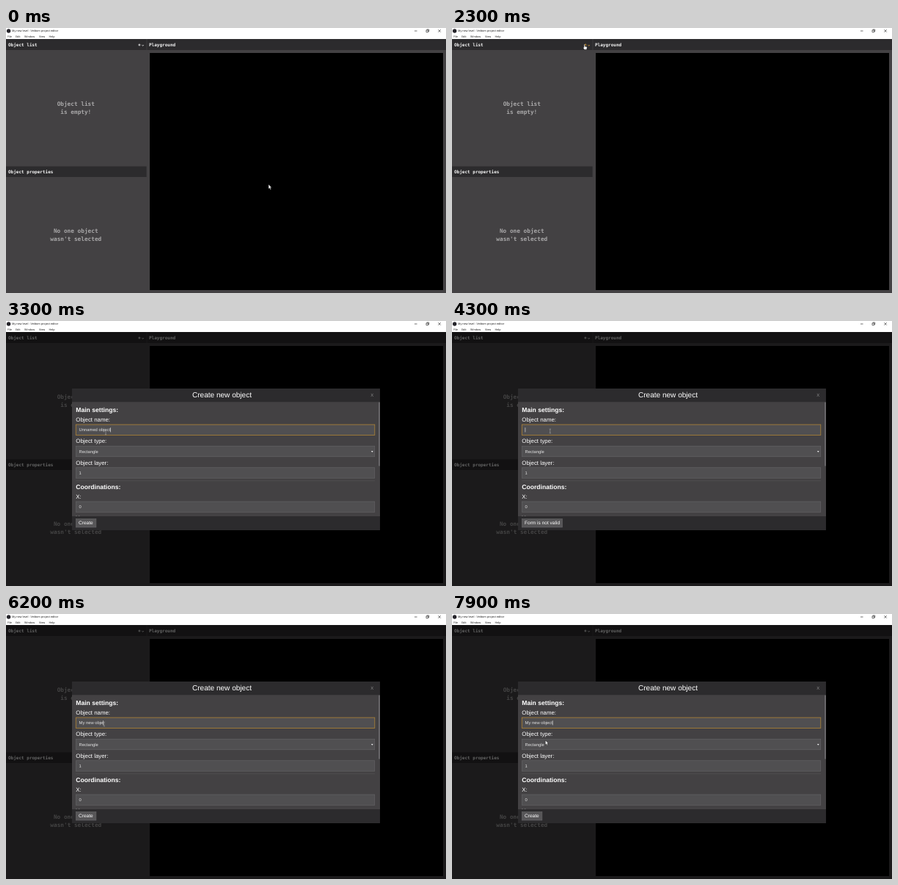
These frames come from a looping animation (600 px wide and 361 px high, 8000 ms). An HTML page:

```html
<!DOCTYPE html>
<html lang="en">
<head>
<meta charset="utf-8">
<title>Project editor</title>
<style>
  html, body { margin: 0; width: 100%; height: 100%; overflow: hidden; background: #434143; }
  svg { display: block; width: 100vw; height: 100vh; }
  text { white-space: pre; text-rendering: geometricPrecision; font-family: "Liberation Sans", Arial, sans-serif; fill: #fff; }
  .bar text { font: 3.75px "Open Sans", "Noto Sans", sans-serif; fill: #111; }
  .head { font: bold 6px "DejaVu Sans Mono", monospace; fill: #f4f4f4; }
  .note { font: bold 7.75px "DejaVu Sans Mono", monospace; fill: #a9a8a9; text-anchor: middle; }
  .dark { fill: #2c2b2d; }
  .title { font-size: 10.05px; }
  .section { font-size: 8.6px; font-weight: bold; }
  .label { font-size: 7.87px; }
  .value { font-size: 5.83px; fill: #e2e2e2; }
  .field { fill: #504f51; stroke: #676668; stroke-width: .6; }
  .field.focus { stroke: #b08436; stroke-width: .8; }
  .line { fill: none; stroke-width: .6; }
</style>
</head>
<body>
<svg viewBox="0 0 600 361" preserveAspectRatio="none">
  <rect width="600" height="361" fill="#434143"/>
  <g class="dark">
    <rect y="15" width="191.6" height="15"/>
    <rect x="192.4" y="15" width="407.6" height="15"/>
    <rect y="188.5" width="191.6" height="14.5"/>
  </g>
  <rect x="196" y="34" width="400" height="323"/>
  <text class="head" x="3" y="24.8">Object list</text>
  <text class="head" x="195" y="24.8">Playground</text>
  <text class="head" x="3" y="198">Object properties</text>
  <text class="note" x="95.3" y="106.4">Object list</text>
  <text class="note" x="95.3" y="117.4">is empty!</text>
  <text class="note" x="95.3" y="279">No one object</text>
  <text class="note" x="95.3" y="290">wasn't selected</text>
  <path id="tools" class="line" style="stroke-width:.9" d="M180.4 23h3M181.9 21.5v3M185.4 23.3l1.2 .9 1.2-.9"/>

  <g class="bar">
    <rect width="600" height="15" fill="#fff"/>
    <circle cx="3.6" cy="4" r="2.7" fill="#25242a"/>
    <text x="8" y="5.3">My new level - Veldom project editor</text>
    <text x="2" y="13.2">File</text>
    <text x="13" y="13.2">Edit</text>
    <text x="25" y="13.2">Window</text>
    <text x="45" y="13.2">View</text>
    <text x="58.5" y="13.2">Help</text>
    <path class="line" stroke="#111" d="M557 4h3.6M573 3h2.7v2.7h-2.7zM574 3v-1h2.7v2.7h-1M589.4 2.2l3.4 3.4M592.8 2.2l-3.4 3.4"/>
  </g>

  <g id="modal">
    <rect y="15" width="600" height="346" opacity=".6"/>
    <rect x="90" y="92" width="420" height="193" fill="#434143"/>
    <g id="form"></g>
    <path class="line" stroke="#565557" d="M95 217.7h408"/>
    <path d="M498 177.1h2.6l-1.3 1.8z" fill="#eee"/>
    <rect x="508.2" y="110.5" width="1.6" height="87" fill="#727173"/>
    <rect class="dark" x="90" y="92" width="420" height="18.3"/>
    <rect class="dark" x="90" y="266" width="420" height="19"/>
    <text class="title" x="254" y="104.4">Create new object</text>
    <text x="497.2" y="103.4" font-size="6" style="fill:#8b8b8b">X</text>
    <rect id="button" class="field" style="fill:#575658" x="95.3" y="269.5" height="11.5"/>
    <text id="action" x="99" y="277.4" font-size="6.55"></text>
    <rect id="selection" y="144.3" height="7.4" fill="#2f6fc4"/>
    <text id="name" class="value" x="99.6" y="150.1"></text>
    <rect id="caret" y="145.2" width=".6" height="6.2" fill="#eee"/>
  </g>

  <g id="cursor" stroke-linejoin="round">
    <path id="arrow" fill="#fff" stroke="#000" stroke-width=".4" d="M0 0v6.2l1.4-1.2 1.1 2.3 1-.5-1.1-2.2h1.9z"/>
    <path id="hand" fill="#fff" stroke="#000" stroke-width=".4" d="M-.4.6q.7-.9 1.2 0v2.3l2.5.6q.7.2.6 1l-.6 3h-3l-1.9-2.7q0-.8.7-.5l.5.5z"/>
    <path id="beam" class="line" stroke="#bbb" style="stroke-width:.5" d="M-1.1-2.9h.8l.3.4.3-.4h.8M0-2.5v5M-1.1 2.9h.8l.3-.4.3.4h.8"/>
  </g>
</svg>
<script>
const $ = id => document.getElementById(id);
const LOOP = 8000, STEP = 100;

// Form rows: section titles, labels and fields
const label = (kind, y, s) => `<text class="${kind}" x="95.3" y="${y}">${s}</text>`;
const field = (y, s, id = "") =>
  `<rect id="${id}" class="field" x="95.3" y="${y}" width="407.5" height="14.3"/>` +
  `<text class="value" x="99.6" y="${y + 9}">${s}</text>`;
$("form").innerHTML =
  label("section", 124.1, "Main settings:") +
  label("label", 137, "Object name:") + field(141.1, "", "nameField") +
  label("label", 166.3, "Object type:") + field(170.5, "Rectangle") +
  label("label", 195.7, "Object layer:") + field(199.8, "1") +
  label("section", 229, "Coordinations:") +
  label("label", 241.8, "X:") + field(246, "0") +
  label("label", 271, "Y:");

// Pointer stops: time, x, y
const path = [
  [0, 358, 213], [400, 355, 201], [900, 355, 201], [1000, 346, 189],
  [1800, 188, 23.5], [1900, 180.3, 22], [2500, 180.3, 22], [2900, 153, 147],
  [3100, 153, 147], [3200, 145, 160], [3300, 136, 152], [3400, 133.8, 150],
  [7400, 133.8, 150], [7900, 127.3, 172], [LOOP, 127.3, 172]
];
// Time of each keystroke
const typed = "My new object";
const keys = [4600, 5000, 5200, 5300, 5500, 5600, 5600, 5800, 6000, 6100, 6200, 6400, 6500];

function pointer(t) {
  const i = path.findIndex(p => p[0] > t);
  const [t0, x0, y0] = path[i - 1], [t1, x1, y1] = path[i];
  const u = (t - t0) / (t1 - t0), e = u * u * (3 - 2 * u);
  return [x0 + (x1 - x0) * e, y0 + (y1 - y0) * e];
}

const show = (id, on) => $(id).style.display = on ? "" : "none";

function draw(t) {
  const open = t >= 2400, focus = t >= 3300, cleared = t >= 4100;
  const hover = t >= 1900 && !open;
  const invalid = t >= 4300 && t < 4600;
  const count = keys.filter(k => k <= t).length;

  $("tools").setAttribute("stroke", hover ? "#d89a35" : "#eee");
  show("modal", open);
  $("nameField").classList.toggle("focus", focus);
  const name = $("name");
  name.textContent = cleared ? typed.slice(0, count) : "Unnamed object";

  $("action").textContent = invalid ? "Form is not valid" : "Create";
  $("button").setAttribute("width", invalid ? 55.2 : 27.6);

  // Second click selects a word, third click the whole value
  show("selection", t >= 3600 && !cleared);
  const from = t < 3700 ? 126.5 : 99.4;
  $("selection").setAttribute("x", from);
  $("selection").setAttribute("width", 142.4 - from);

  const since = count ? keys[count - 1] : cleared ? 4100 : 3300;
  show("caret", focus && (t < 3600 || cleared) && (t - since) % 1000 < 500);
  if (open) $("caret").setAttribute("x", 99.6 + (name.textContent ? name.getComputedTextLength() : 0));

  const [x, y] = pointer(t);
  const inField = open && y > 141 && y < 155.5;
  $("cursor").setAttribute("transform", `translate(${x} ${y})`);
  show("hand", hover);
  show("beam", inField);
  show("arrow", !hover && !inField);
}

const start = performance.now();
function tick() {
  const t = (performance.now() - start) % LOOP;
  draw(Math.floor(t / STEP) * STEP);
  requestAnimationFrame(tick);
}
tick();
</script>
</body>
</html>
```
